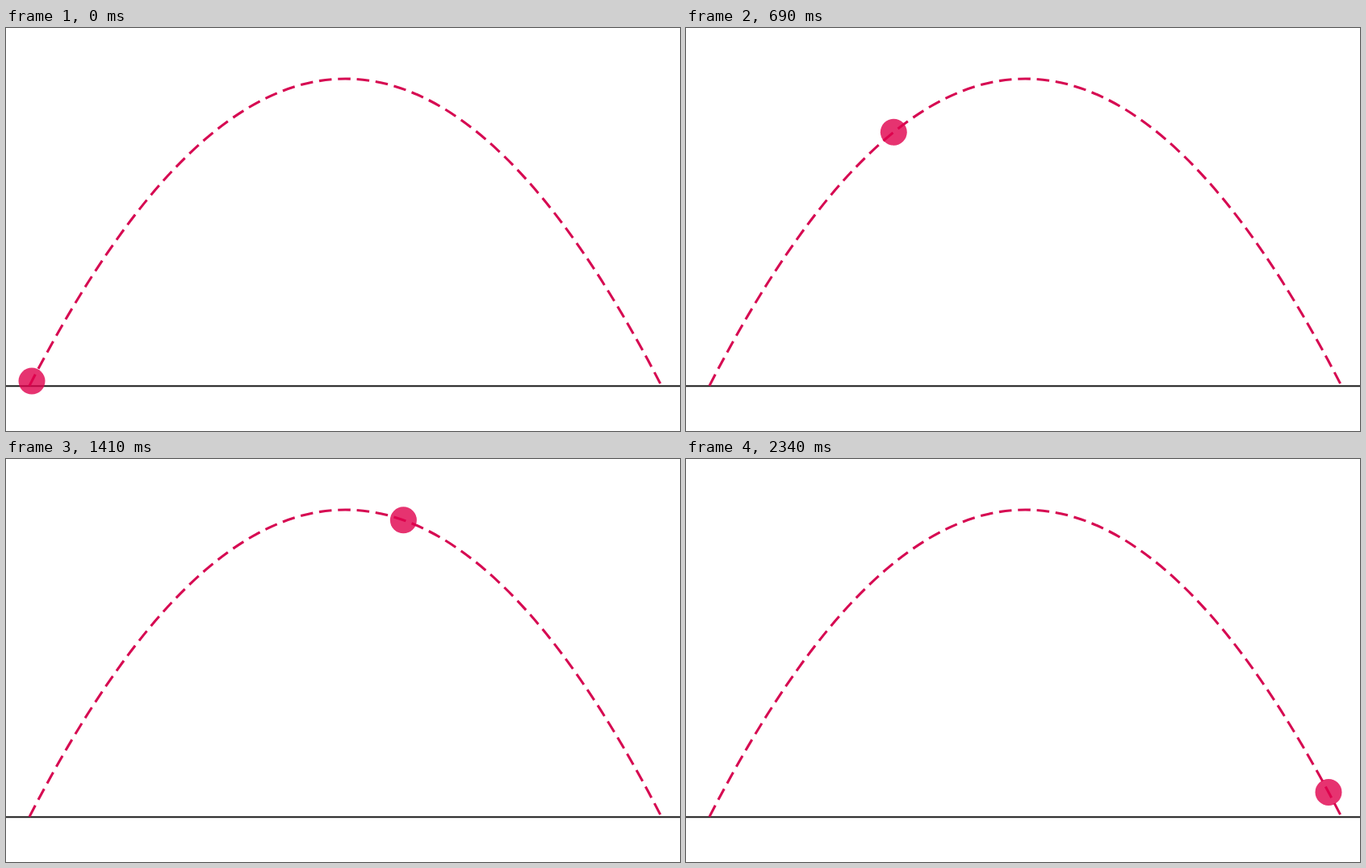
An HTML page that plays this animation: 835x500 px, repeating every 2370 ms.

```html
<!DOCTYPE html>
<html>
<head>
<meta charset="utf-8">
<style>
  html, body { margin: 0; width: 100%; height: 100%; overflow: hidden; background: #fff; }
  svg { display: block; }
</style>
</head>
<body>
<svg width="835" height="500" viewBox="0 0 835 500">
  <path d="M0 444.2H835" stroke="#1c1c1c" stroke-width="2"/>
  <path id="arc" fill="none" stroke="#d60b52" stroke-width="3.1" stroke-dasharray="15.6 7.8"/>
  <circle id="ball" r="16.5" fill="#e0004d" fill-opacity=".8"/>
</svg>
<script>
  const LOOP = 2370, STEP = 30;
  const START = 32, SPEED = 0.3265;
  const apex = { x: 420.5, y: 63 }, curve = 0.002485, reach = 391.5;
  const height = x => apex.y + curve * (x - apex.x) ** 2;

  // The control point of a parabola lies as far above the apex as the ends lie below.
  const drop = curve * reach ** 2;
  arc.setAttribute('d', `M${apex.x - reach} ${apex.y + drop}Q${apex.x} ${apex.y - drop} ${apex.x + reach} ${apex.y + drop}`);

  function draw(now) {
    const t = Math.floor(now % LOOP / STEP) * STEP;
    const x = START + SPEED * t;
    ball.setAttribute('cx', x);
    ball.setAttribute('cy', height(x));
  }

  function tick() {
    draw(performance.now());
    requestAnimationFrame(tick);
  }
  tick();
</script>
</body>
</html>
```
